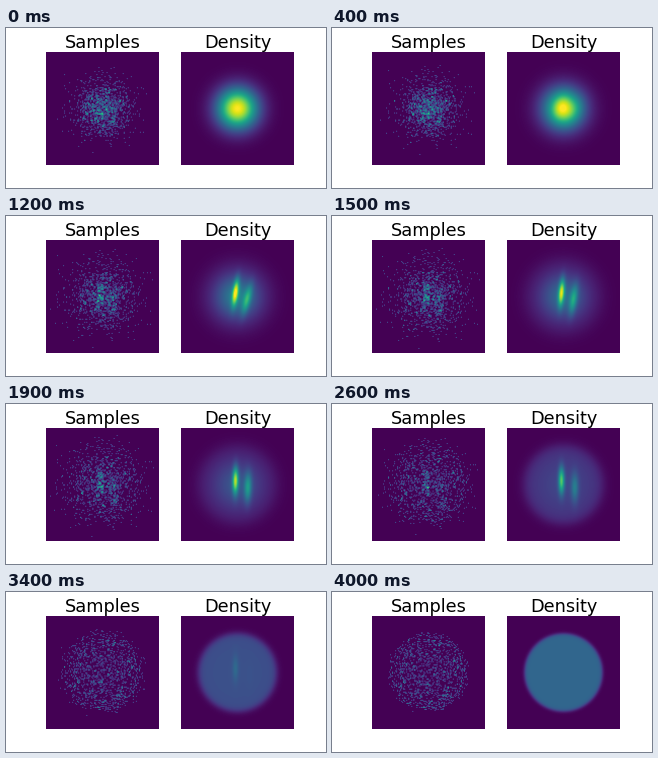
Animation of 320 by 160 pixels, one loop 4.1 s. Source, as a matplotlib script:

```python
import numpy as np
import matplotlib.pyplot as plt
from matplotlib.animation import FuncAnimation

FRAMES, STEP = 41, 100
BINS, HALF = 112, 56.35
COUNT = 1300

# Cell centres in pixels from the middle of a panel, y pointing down.
axis = (np.arange(BINS) + 0.5) / BINS * 2 * HALF - HALF
X, Y = np.meshgrid(axis, axis)
R = np.hypot(X, Y)

rng = np.random.default_rng(4)
pick_x, pick_y = rng.random((2, COUNT))


def ease(t, start, end):
    s = np.clip((t - start) / (end - start), 0, 1)
    return s * s * (3 - 2 * s)


def streak(cx, cy, tilt, length, width):
    a = np.radians(tilt)
    dx, dy = X - cx, Y - cy
    along = dx * np.sin(a) - dy * np.cos(a)
    across = dx * np.cos(a) + dy * np.sin(a)
    return np.exp(-(along / length) ** 2 / 2 - (across / width) ** 2 / 2)


def density(t):
    """A round blob is sheared into two streaks, then settles into a disc."""
    shear = ease(t, 0, 0.25)
    fade = 1 - ease(t, 0.55, 0.95)
    upright = max(0, 1 - 2 * t)
    width = 2 + 6 * (1 - shear)

    blob = np.exp(-(R / (14 + 6 * t)) ** 2 / 2)
    disc = 1 / (1 + np.exp((R - 38.5) / (1 + 6 * (1 - t))))
    middle = streak(-2, -4 * shear, 20 * upright, 9, width)
    side = streak(8 + 5 * t, 3, 35 * upright, 10, width + 0.5)
    return ((1 - t) ** 2.5 * blob + 0.33 * t ** 2 * disc
            + shear * fade * (0.65 * middle + 0.33 * fade * side))


def samples(field):
    """Count fixed random quantiles after mapping them through the density."""
    total = np.cumsum(field.sum(axis=0))
    cols = np.searchsorted(total / total[-1], pick_x)
    tall = np.cumsum(field, axis=0)
    rows = ((tall / tall[-1])[:, cols] < pick_y).sum(axis=0)
    counts = np.zeros((BINS, BINS))
    np.add.at(counts, (rows, cols), 1)
    return counts


fig, axes = plt.subplots(1, 2, figsize=(8, 4), dpi=40)
images = []
for ax, title, top in zip(axes, ("Samples", "Density"), (4, 1)):
    ax.set_title(title, fontsize=32, family="DejaVu Sans")
    ax.axis("off")
    images.append(ax.imshow(np.zeros((BINS, BINS)), cmap="viridis",
                            vmin=0, vmax=top))


def draw(i):
    field = density(i / (FRAMES - 1))
    images[0].set_data(samples(field))
    images[1].set_data(field)
    return images


anim = FuncAnimation(fig, draw, frames=FRAMES, interval=STEP,
                     repeat=True, repeat_delay=0)
plt.show()
```
